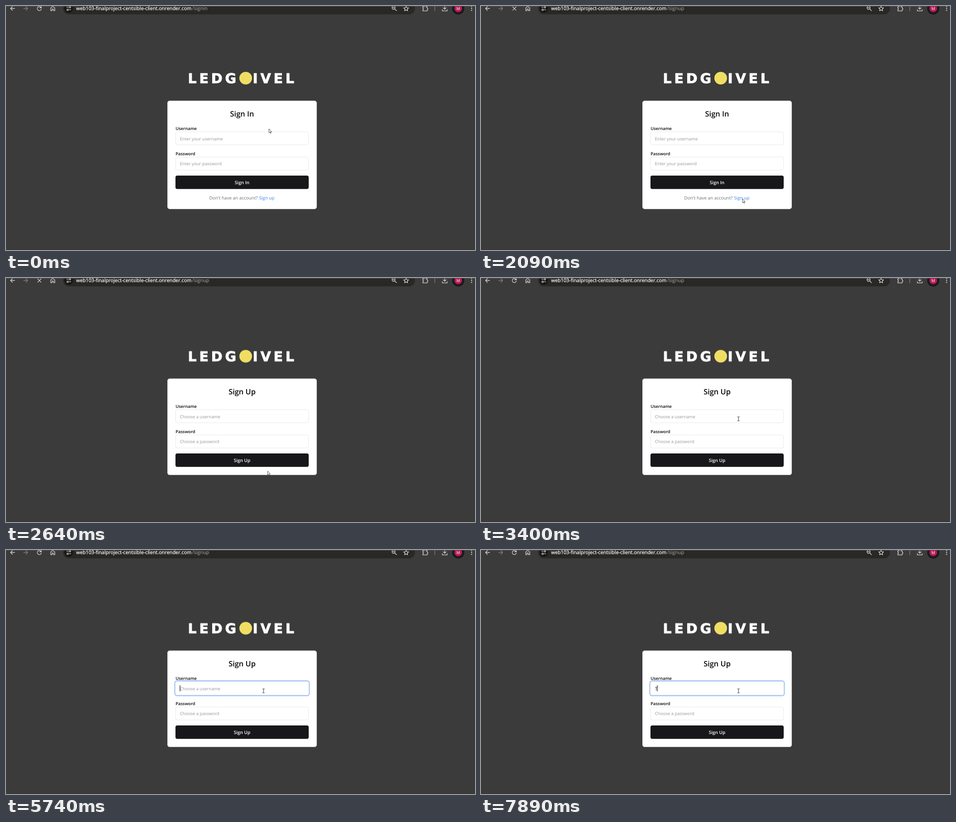
An HTML page that plays this animation: 1035 px wide and 541 px high, repeating every 8 s.

```html
<!DOCTYPE html>
<html lang="en">
<head>
<meta charset="utf-8">
<title>Sign up flow</title>
<style>
html, body { margin: 0; width: 100%; height: 100%; overflow: hidden; background: #3b3b3b; }
svg { display: block; width: 100%; height: 100%; }
text { font-family: "Open Sans", "Noto Sans", sans-serif; text-rendering: geometricPrecision; white-space: pre; }

.url { font-size: 10.85px; fill: #fff; stroke: #fff; stroke-width: .25; }
.url.path { fill: #adada9; stroke: none; }
.icon { fill: none; stroke: #d6d6d6; stroke-width: 1.3; stroke-linecap: round; stroke-linejoin: round; }
.dim { stroke: #7e7e7e; }
.logo text { font: bold 30px "DejaVu Sans", sans-serif; letter-spacing: 5.8px; fill: #fff; stroke: #fff; stroke-linejoin: round; }

.card { fill: #fff; stroke: #e5e7eb; stroke-width: .6; }
.title { font-size: 16.4px; font-weight: 600; fill: #09090b; text-anchor: middle; }
.label { font-size: 9.4px; font-weight: 600; fill: #09090b; }
.field { fill: #fff; stroke: #e4e6ea; stroke-width: .9; }
.hint { font-size: 9.6px; fill: #94979e; }
.button { font-size: 10.05px; font-weight: 600; fill: #fff; text-anchor: middle; }
.note { font-size: 9.88px; fill: #6b6f76; }
.link { fill: #3b87ef; }

/* Every track lasts one loop and jumps between its poses. */
.track { animation: 8s step-end infinite; }
#reload { animation-name: reload; }
#stop { animation-name: stop; }
#pathIn { animation-name: pathIn; }
#pathUp { animation-name: pathUp; }
#logo { animation-name: logo; }
#signIn { animation-name: signIn; }
#signUp { animation-name: signUp; }
#underline { animation-name: underline; }
#focus { animation-name: focus; }
#nameHint { animation-name: nameHint; }
#typed { animation-name: typed; }
#caret { animation-name: caret; }
#pointer { animation-name: pointer; }
#arrow { animation-name: arrow; }
#hand { animation-name: hand; }
#beam { animation-name: beam; }

@keyframes reload { 0%, 34.5%, 100% { opacity: 1 } 22.375% { opacity: 0 } }
@keyframes stop { 0%, 34.5%, 100% { opacity: 0 } 22.375% { opacity: 1 } }
@keyframes pathIn { 0% { opacity: 1 } 26.125%, 100% { opacity: 0 } }
@keyframes pathUp { 0% { opacity: 0 } 26.125%, 100% { opacity: 1 } }
@keyframes logo {
  0% { opacity: 1; transform: none }
  31.5% { opacity: 0; transform: none }
  33%, 100% { opacity: 1; transform: translateY(13.5px) }
}
@keyframes signIn { 0% { opacity: 1 } 31.5%, 100% { opacity: 0 } }
@keyframes signUp {
  0% { opacity: 0; transform: translateY(-2px) }
  31.5% { opacity: 1; transform: translateY(-2px) }
  33%, 100% { opacity: 1; transform: translateY(13px) }
}
@keyframes underline { 0%, 26.125%, 100% { opacity: 0 } 18.625% { opacity: 1 } }
@keyframes focus { 0% { opacity: 0 } 45.875%, 100% { opacity: 1 } }
@keyframes nameHint { 0% { opacity: 1 } 98.625%, 100% { opacity: 0 } }
@keyframes typed { 0% { opacity: 0 } 98.625%, 100% { opacity: 1 } }
@keyframes caret {
  0%, 51.25%, 64.5%, 76.875%, 91.5% { opacity: 0; transform: none }
  45.875%, 58.75%, 71.75%, 84.125% { opacity: 1; transform: none }
  98.625%, 100% { opacity: 1; transform: translateX(5px) }
}
@keyframes pointer {
  0% { transform: translate(580px, 272px) }
  6.25% { transform: translate(588px, 305px) }
  7.75% { transform: translate(598px, 350px) }
  9.25% { transform: translate(601.5px, 386px) }
  11.125% { transform: translate(590px, 402px) }
  12.625% { transform: translate(565px, 420px) }
  14.125% { transform: translate(545px, 429.5px) }
  15.625% { transform: translate(537.5px, 430px) }
  17.125% { transform: translate(556px, 429px) }
  18.625% { transform: translate(576.8px, 427px) }
  31.5% { transform: translate(577px, 427.5px) }
  37.625% { transform: translate(614px, 345px) }
  39.125% { transform: translate(595px, 292px) }
  40.625% { transform: translate(581px, 302px) }
  42.5%, 100% { transform: translate(568.3px, 312.3px) }
}
@keyframes arrow {
  0%, 20.5%, 24.25% { opacity: 1 }
  18.625%, 22.375%, 39.125%, 100% { opacity: 0 }
}
@keyframes hand {
  0%, 20.5%, 24.25%, 100% { opacity: 0 }
  18.625%, 22.375% { opacity: 1 }
}
@keyframes beam { 0% { opacity: 0 } 39.125%, 100% { opacity: 1 } }
</style>
</head>
<body>
<svg viewBox="0 0 1035 541">
  <defs>
    <g id="fields">
      <text class="label" x="374.3" y="275">Username</text>
      <rect class="field" x="374.4" y="278.9" width="293.2" height="29" rx="4"/>
      <text class="label" x="374.3" y="331.2">Password</text>
      <rect class="field" x="374.4" y="334.9" width="293.2" height="29" rx="4"/>
      <rect x="374" y="376" width="294" height="29.7" rx="4" fill="#18181b"/>
    </g>
  </defs>

  <rect width="1035" height="541" fill="#3b3b3b"/>
  <rect y="540" width="1035" height="1" fill="#313131"/>

  <!-- Browser bar -->
  <rect x="126" y="-8" width="776.5" height="26.5" rx="13" fill="#282824"/>
  <g class="icon">
    <path d="M19 5.5H10M14.2 1.2 10 5.5l4.2 4.3"/>
    <path class="dim" d="M39 5.5h9M43.8 1.2 48 5.5l-4.2 4.3"/>
    <path id="reload" class="track" d="M77.3 3.2A4.5 4.5 0 1 0 78 6.6M78 .8v3.2h-3.3"/>
    <path id="stop" class="track" d="m70 2 7.4 7.4M77.4 2 70 9.4"/>
    <path d="M98.8 10.4V4.2L103.2.8l4.4 3.4v6.2h-2.9V6.6h-3v3.8z"/>
  </g>
  <circle cx="138.5" cy="5.5" r="9.5" fill="#161616"/>
  <g class="icon">
    <path d="M134 2.8h3.2M139.6 8.4h3.4"/>
    <circle cx="141" cy="2.8" r="1.7"/>
    <circle cx="136" cy="8.4" r="1.7"/>
  </g>
  <text class="url" x="154.8" y="9.3">web103-finalproject-centsible-client.onrender.com</text>
  <text id="pathIn" class="url path track" x="410.7" y="9.3">/signin</text>
  <text id="pathUp" class="url path track" x="410.7" y="9.3">/signup</text>
  <g class="icon">
    <circle cx="855.3" cy="4" r="3.5"/>
    <path d="m858 6.7 3.8 3.8M853.7 4h3.2"/>
    <path d="m883 .2 1.6 3.6 3.9.4-2.9 2.6.8 3.8-3.4-2-3.4 2 .8-3.8-2.9-2.6 3.9-.4z"/>
    <path d="M919.8 1.6h3.2c0-2.4 3.4-2.4 3.4 0h3.1v3.3c2.2 0 2.2 3.1 0 3.1v2.8h-9.7V8c2.2 0 2.2-3.1 0-3.1z"/>
    <path class="dim" d="M946.3 0v10.5"/>
    <path d="M968.2-1v8M964.8 3.9l3.4 3.3 3.4-3.3M962.8 8v2.8h10.8V8"/>
  </g>
  <circle cx="998" cy="5.5" r="13.5" fill="#1b1b1b"/>
  <circle cx="998" cy="5.5" r="8.3" fill="#c2185b"/>
  <text x="998" y="8.8" font-size="8.8" fill="#fff" text-anchor="middle">M</text>
  <g fill="#d6d6d6">
    <circle cx="1027.5" cy="1.3" r="1.2"/>
    <circle cx="1027.5" cy="5.5" r="1.2"/>
    <circle cx="1027.5" cy="9.7" r="1.2"/>
  </g>
  <rect width="1035" height="1" fill="#555"/>

  <g id="logo" class="logo track">
    <text x="401.5" y="171">LEDG</text>
    <circle cx="529" cy="160" r="14" fill="#f0de64"/>
    <text x="544.5" y="171">IVEL</text>
  </g>

  <g id="signIn" class="track">
    <rect class="card" x="356.3" y="210.2" width="329.4" height="239.8" rx="5"/>
    <text class="title" x="521" y="244.6">Sign In</text>
    <use href="#fields"/>
    <text class="hint" x="383.7" y="297.6">Enter your username</text>
    <text class="hint" x="383.7" y="353.4">Enter your password</text>
    <text class="button" x="521" y="394.8">Sign In</text>
    <text class="note" x="448.6" y="428.6">Don't have an account?</text>
    <text class="note link" x="558.4" y="428.6">Sign up</text>
    <rect id="underline" class="track link" x="558.6" y="429.8" width="34.4" height=".8"/>
  </g>

  <g id="signUp" class="track">
    <rect class="card" x="356.3" y="210.2" width="329.4" height="213.4" rx="5"/>
    <text class="title" x="521" y="244.6">Sign Up</text>
    <use href="#fields"/>
    <rect id="focus" class="track" x="372.4" y="277.1" width="297.2" height="33" rx="5" fill="none" stroke="#8db5f3" stroke-width="1.6"/>
    <text id="nameHint" class="hint track" x="383.7" y="297.6">Choose a username</text>
    <text id="typed" class="hint track" x="383.7" y="297.6" style="fill:#222">T</text>
    <rect id="caret" class="track" x="383.4" y="287" width="1.2" height="13.4" fill="#111"/>
    <text class="hint" x="383.7" y="353.4">Choose a password</text>
    <text class="button" x="521" y="394.8">Sign Up</text>
  </g>

  <g id="pointer" class="track" fill="#fff" stroke="#222" stroke-width=".8" stroke-linejoin="round">
    <path id="arrow" class="track" d="M.3.4v8.8l2-1.8 1.4 3 1.3-.6-1.4-2.9h2.8z"/>
    <path id="hand" class="track" d="M-.8 6.4V1.2c0-1.2 1.6-1.2 1.6 0v3l3.6.8c.9.2 1.2.8 1.1 1.6l-.6 3.2-.7 1.6H-.2L-3.6 7.2c-.8-1 .4-1.8 1.2-1.3z"/>
    <path id="beam" class="track" fill="none" stroke-width="1" d="M-2.4-4.4h1.6q.8 0 .8.8v7.2q0 .8-.8.8h-1.6M2.4-4.4H.8Q0-4.4 0-3.6M2.4 4.4H.8Q0 4.4 0 3.6"/>
  </g>
</svg>
</body>
</html>
```
